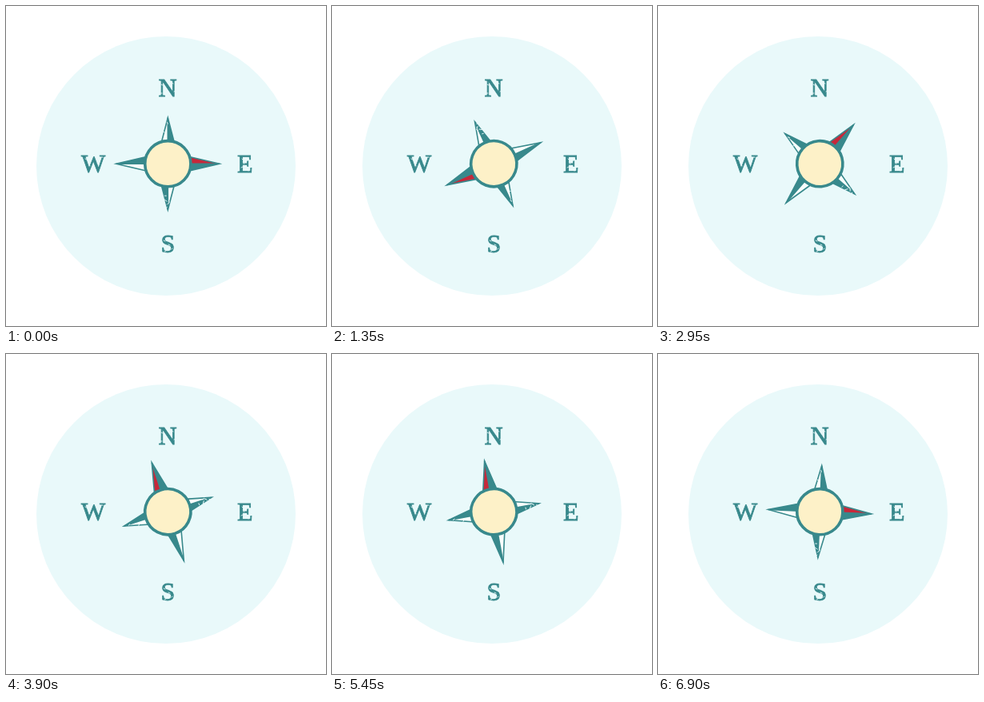
Recreate the animation shown at these times as an HTML page. Size 400 px wide and 400 px high, loop 7000 ms.

```html
<!DOCTYPE html>
<html lang="en">
<head>
<meta charset="utf-8">
<title>Compass</title>
<style>
  html, body { margin: 0; width: 100%; height: 100%; overflow: hidden; background: #fff; }
  svg { display: block; width: 100vw; height: 100vh; }
  text {
    font: 32px "Liberation Serif", "Times New Roman", serif;
    text-anchor: middle;
    fill: #38898c; stroke: #38898c; stroke-width: .8;
  }
  .teal { fill: #38898c; }
  .light { fill: #f8fefc; }
  .red { fill: #c6283a; }
  .edge { fill: none; stroke: #38898c; stroke-width: 1.6; stroke-miterlimit: 8; }
  .wear { fill: none; stroke: #e9f9fa; stroke-width: .9; stroke-linecap: round; }
</style>
</head>
<body>
<svg viewBox="0 0 400 400">
  <circle cx="200" cy="200" r="162" fill="#e9f9fa"/>
  <text x="202" y="112.5">N</text>
  <text x="109" y="208">W</text>
  <text x="298.7" y="208">E</text>
  <text x="202.3" y="308">S</text>
  <path class="wear" d="M194 98l2 1M207 96l2 1M199 104l1 1M210 107l2-1M193 109l2 0
    M99 191l2 1M104 198l1 2M114 196l2-1M111 203l1 1M120 189l1 0
    M295 191l1 1M294 202l2-1M303 206l2-1M297 197l1 0
    M197 293l2 1M203 298l2 1M199 303l1-1M207 304l1-1M198 307l2-1"/>
  <g id="needle">
    <g id="spikes"></g>
    <path class="wear" d="M-4 45l3 2M-1 51l2-2M-4 40l2 0M1 46l1 2M-2 55l1-1M-1 -52l1 2M-5 -40l1 1"/>
    <circle r="28.6" fill="#fdf1c8" stroke="#38898c" stroke-width="3.6"/>
  </g>
</svg>
<script>
  const LOOP = 7000, STEP = 50, LAST = 6900;

  // [time in ms, heading in degrees clockwise from east]
  const swings = [
    [0, 0], [2750, 320], [3700, 240], [4400, 300],
    [5200, 245], [5650, 270], [6050, 270], [6950, 0]
  ];

  const needle = document.getElementById("needle");

  // The mitred outline carries the point a little past tip.
  function spike(turn, tip, half, tone) {
    const base = 26;
    const side = (y, name) =>
      `<path class="${name}" d="M${base} 0V${y}L${tip} 0Z"/>`;
    return `<g transform="rotate(${turn})">` +
      side(-half, tone) + side(half, "teal") +
      `<path class="edge" d="M${base} ${-half}L${tip} 0L${base} ${half}"/>` +
      `<path class="edge" d="M${base} 0H${tip}"/></g>`;
  }

  document.getElementById("spikes").innerHTML =
    spike(0, 64.5, 9, "red") + spike(90, 57.5, 8.2, "light") +
    spike(180, 64.5, 9, "light") + spike(270, 57.5, 8.2, "light");

  const ease = u => u * u * (3 - 2 * u);

  function heading(t) {
    const i = swings.findIndex(([end]) => end > t);
    const [t0, a] = swings[i - 1], [t1, b] = swings[i];
    return a + (b - a) * ease((t - t0) / (t1 - t0));
  }

  const start = performance.now();

  function draw(now) {
    const time = Math.max(0, now - start) % LOOP;
    const t = Math.min(LAST, Math.floor(time / STEP) * STEP);
    needle.setAttribute("transform", `translate(202.3 197.2) rotate(${heading(t).toFixed(2)})`);
    requestAnimationFrame(draw);
  }
  draw(start);
</script>
</body>
</html>
```
